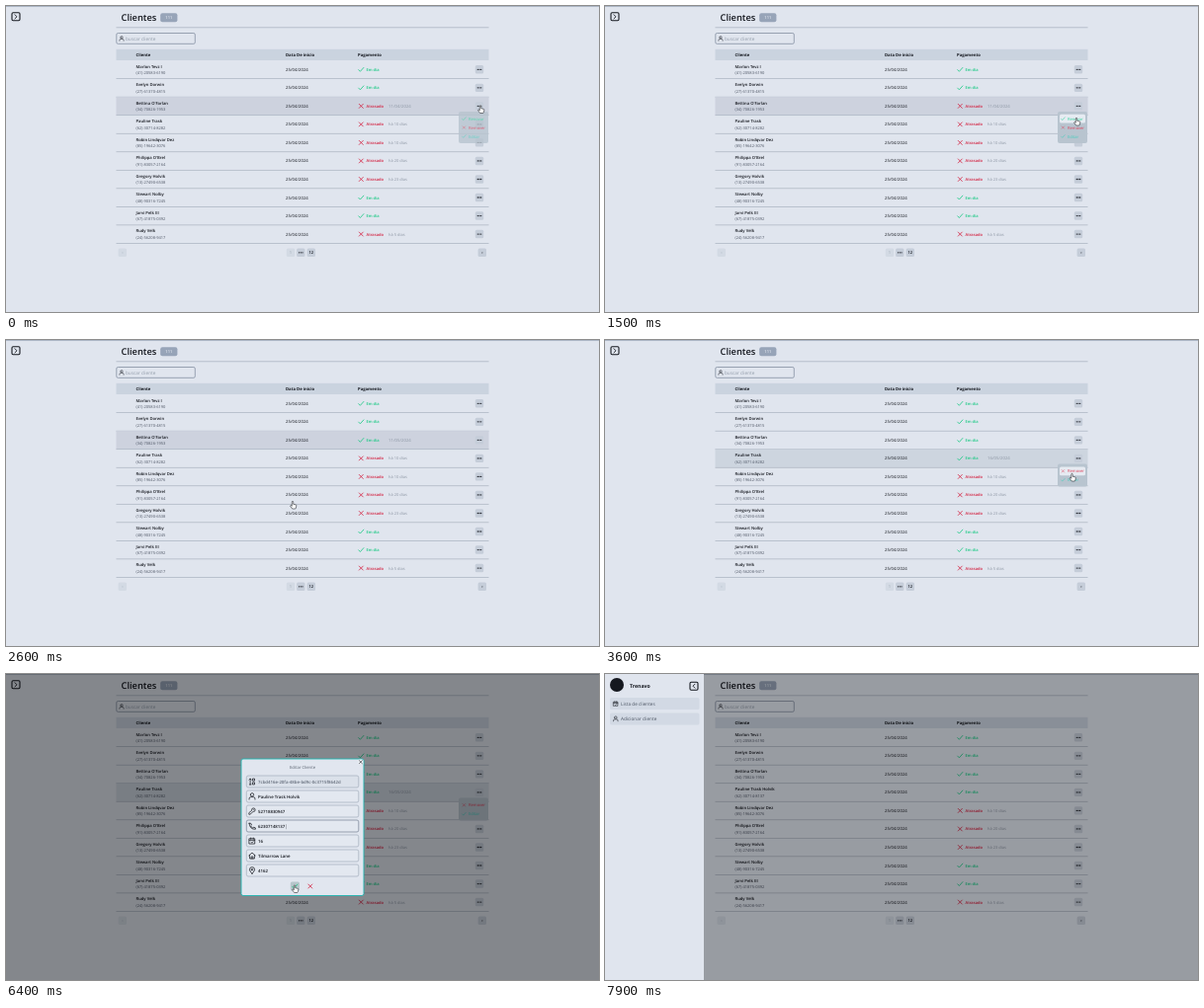
An HTML page for the animation above (8 s loop, 600 by 310 pixels).

```html
<!DOCTYPE html>
<html lang="pt">
<head>
<meta charset="utf-8">
<title>Clientes</title>
<style>
html, body { margin: 0; width: 100%; height: 100%; overflow: hidden; background: #e0e5ee; }
svg { display: block; width: 600px; height: 310px; font-family: "Open Sans", "Noto Sans", sans-serif; text-rendering: geometricPrecision; }
</style>
</head>
<body>
<svg id="stage" viewBox="0 0 600 310"></svg>
<script>
const LOOP = 8000, STEP = 100;
const INK = '#15181f', GREEN = '#18c983', RED = '#d3203f', GRAY = '#8e97a5', PAGE = '#e0e5ee';
const stage = document.getElementById('stage');

// name, phone, days overdue (0 = paid)
const clients = [
  ['Marlon Tevz I', '(41) 20583-6190', 0],
  ['Evelyn Dorwin', '(27) 61370-4815', 0],
  ["Bettina O'Farlan", '(34) 70826-1953', 15],
  ['Pauline Trask', '(62) 30714-8282', 10],
  ['Robin Lindqvar Dez', '(85) 19642-3076', 10],
  ["Philippa O'Brel", '(91) 83057-2164', 20],
  ['Gregory Holvik', '(13) 27490-6538', 23],
  ['Stewart Nolby', '(48) 90316-7245', 0],
  ['Jarvi Pelk III', '(67) 41875-0392', 0],
  ['Rudy Velk', '(24) 56208-9417', 5]
];

const modal = { renewOpen: 1700, renewClose: 2600, editOpen: 4600, editClose: 6500 };
const SIDEBAR = 7600;

// time, x, y of the pointer's tip
const pointerPath = [
  [0, 480, 101], [800, 479, 103], [1400, 477, 113.5], [1700, 477, 113.5], [2300, 290, 163.5], [2600, 290, 163.5],
  [3100, 479, 119], [3600, 472.5, 135.5], [4200, 472.5, 140], [4700, 472.5, 140], [5200, 330, 127],
  [5500, 300, 154], [6100, 300, 154], [6400, 292, 214], [6600, 292, 214], [7100, 138.5, 34], [7500, 10, 10], [8000, 10, 10]
];

const clamp = v => Math.max(0, Math.min(1, v));
const ramp = (t, from, length) => clamp((t - from) / length);
const easeOut = p => 1 - (1 - p) ** 3;
const within = (t, a, b) => t >= a && t < b;

function pointerAt(t) {
  const i = pointerPath.findIndex(p => p[0] > t);
  const [t0, x0, y0] = pointerPath[i - 1], [t1, x1, y1] = pointerPath[i];
  const p = (t - t0) / (t1 - t0), e = p * p * (3 - 2 * p);
  return [x0 + (x1 - x0) * e, y0 + (y1 - y0) * e];
}

const rect = (x, y, w, h, fill, r = 0, stroke = 'none', sw = 0.6) =>
  `<rect x="${x}" y="${y}" width="${w}" height="${h}" rx="${r}" fill="${fill}" stroke="${stroke}" stroke-width="${sw}"/>`;
const text = (x, y, size, str, fill = INK, weight = 400, anchor = 'start') =>
  `<text x="${x}" y="${y}" font-size="${size}" fill="${fill}" font-weight="${weight}" text-anchor="${anchor}">${str}</text>`;
const line = (d, color, sw = 0.8) =>
  `<path d="${d}" fill="none" stroke="${color}" stroke-width="${sw}" stroke-linecap="round" stroke-linejoin="round"/>`;
const group = (content, x, y, scale = 1, opacity = 1) =>
  `<g transform="translate(${x} ${y}) scale(${scale})" opacity="${opacity}">${content}</g>`;
const check = (x, y, s = 1, c = GREEN) => group(line('M-2.5 .3L-.9 2L2.6 -1.9', c), x, y, s);
const cross = (x, y, s = 1, c = RED) => group(line('M-2 -2L2 2M2 -2L-2 2', c), x, y, s);
const dots = (x, y) => [-1.7, 0, 1.7].map(d => `<circle cx="${x + d}" cy="${y}" r=".65" fill="${INK}"/>`).join('');
const tile = (x, y, content, fill = '#c5cdd9') => rect(x - 4.2, y - 4.2, 8.4, 8.4, fill, 1.5) + content;

const person = 'M-1.6 -1.6a1.6 1.6 0 1 0 3.2 0a1.6 1.6 0 1 0 -3.2 0M-2.8 3v-.8q0-1.6 1.6-1.6h2.4q1.6 0 1.6 1.6v.8';
const icons = {
  id: 'M-1.8 -2.8v5.6M-2.8 -1.8l1-1l1 1M-2.5 2.8h1.5M.8 -2.8h1.6v2h-1.6zM.8 .8h1.6v2h-1.6z',
  person,
  key: 'M-.4 -1a1.7 1.7 0 1 1 1.4 1.4L-2 3.1h-1v-1.2zM1.6 -1.6h.1',
  phone: 'M-2.8 -2.6h1.6l.7 1.7l-.9.8q.7 1.5 2.2 2.1l.8-.9l1.6.7v1.3q-5.6 .2-6-5.7z',
  calendar: 'M-2.6 -2.1h5.2v5h-5.2zM-2.6 -.6h5.2M-1.2 -2.9v1.3M1.2 -2.9v1.3M-1 1.2l.8.7l1.3-1.3',
  house: 'M-3.1 -.1L0 -2.8L3.1 -.1M-2.3 -.6v3.5h4.6v-3.5M-.8 2.9v-2h1.6v2',
  pin: 'M0 3.1q-2.5-2.5-2.5-3.8a2.5 2.5 0 1 1 5 0q0 1.3-2.5 3.8zM-.8 -.7a.8.8 0 1 0 1.6 0a.8.8 0 1 0-1.6 0'
};
const icon = (name, x, y, s = 1) => group(line(icons[name], INK, 0.7), x, y, s);
const toggle = (x, y, dir) => rect(x - 4, y - 4, 8, 8, 'none', 1.2, INK, 1.1) +
  line(`M${x - dir} ${y - 2}l${2 * dir} 2l${-2 * dir} 2`, INK, 0.9);

function header(t) {
  return rect(0, 0, 600, 310, PAGE) + rect(0, 0, 600, 0.7, '#9aa5b6') + toggle(10, 10.8, 1) +
    text(116.5, 15.2, 9.3, 'Clientes', INK, 600) +
    rect(156.2, 7.2, 17.2, 9, '#97a4b8', 2) + text(164.8, 13.3, 4, '111', '#dfe5ee', 600, 'middle') +
    rect(111.5, 21.5, 377, 0.7, '#a5aebc') +
    rect(111.8, 27.5, 79.5, 10.8, 'none', 1.5, within(t, 7000, 7200) ? '#5f6b80' : '#8490a3', 0.8) +
    icon('person', 117, 33, 0.75) + text(121, 34.8, 4.7, 'buscar cliente', '#929caa') +
    rect(111.5, 43.8, 377, 11.2, '#cad3df') +
    [[131.5, 'Cliente'], [283, 'Data De inicio'], [356, 'Pagamento']].map(([x, s]) => text(x, 50.9, 4.2, s, INK, 700)).join('');
}

function status(y, late, note) {
  return (late ? cross(359.3, y) + text(364.5, y + 1.5, 4, 'Atrasado', RED, 600)
               : check(359.3, y) + text(364.5, y + 1.5, 4, 'Em dia', GREEN, 600)) +
    (note ? text(387, y + 1.5, note.includes('/') ? 4.3 : 4, note, GRAY) : '');
}

function table(t) {
  const hovered = t < 2900 ? 2 : t < modal.editClose ? 3 : -1;
  const paidAt = { 2: modal.renewClose, 3: 2900 };
  const edited = t >= modal.editClose;
  return clients.map(([name, phone, days], i) => {
    const top = 55.1 + i * 18.53, y = top + 9.2;
    const late = days > 0 && !(t >= paidAt[i]);
    let note = late ? `há ${days} dias` : '';
    if (i === hovered) note = `${i === 2 ? 11 : 16}/${late ? '04' : '05'}/2024`;
    if (i === 3 && edited) { name += ' Holvik'; phone = '(62) 30714-8137'; }
    return (i === hovered ? rect(111.5, top, 377, 18.5, i === 2 ? '#cdd2de' : '#cdd5df') : '') +
      rect(111.5, top + 18.2, 377, 0.7, '#a9b2bf') +
      text(131.5, y - 1.7, 4.15, name, INK, 600) + text(131.5, y + 4.7, 4, phone, '#4b5362') +
      text(283, y + 1.5, 4.3, '25/04/2024', INK, 500) + status(y, late, note) +
      tile(479, y, dots(479, y));
  }).join('');
}

function pager() {
  const y = 249.8, faint = '#d3dae4';
  const label = (x, s, c = INK) => text(x, y + 1.4, 4, s, c, 600, 'middle');
  return tile(117.8, y, label(117.8, '‹', '#aab3c0'), faint) + tile(288, y, label(288, '1', '#aab3c0'), faint) +
    tile(298.3, y, dots(298.3, y)) + tile(308.8, y, label(308.8, '12')) + tile(481.8, y, label(481.8, '›'));
}

function rowMenu(t) {
  const first = t < modal.renewClose;
  if (!first && !within(t, 3200, modal.editClose)) return '';
  const top = first ? 107 : 125.6;
  const items = [['Renovar', '#30d39b'], ['Remover', '#dd4059'], ['Editar', '#45cdbd']].slice(first ? 0 : 1);
  let hover = -1;
  if (within(t, 1200, 1800)) hover = 0;
  else if (first && t >= 1800) hover = -1;
  else if (within(t, 3400, 4000)) hover = 0;
  else if (within(t, 4000, 4600)) hover = 1;
  const body = rect(458, top, 30, first ? 32 : 22.8, '#b8c4cf', 2) + items.map(([label, color], i) => {
    const y = top + 7.2 + i * 8.9;
    const mark = label === 'Remover' ? cross(463.4, y, 0.6, color) : check(463.4, y, 0.7, color);
    return (i === hover ? rect(460, y - 4.4, 26, 8.8, '#e6ebf2', 1.5) : '') + mark + text(468, y + 1.5, 4.1, label, color, 500);
  }).join('');
  return group(body, 0, 0, 1, first ? 0.8 + 0.2 * ramp(t, 0, 300) : 0.6 + 0.4 * ramp(t, 3200, 200));
}

const shade = opacity => `<rect width="600" height="310" opacity="${opacity}"/>`;
const panel = (x, y, w, h) => rect(x, y, w, h, '#e1e6ef', 2, '#1fb5b0', 0.9) +
  rect(x + w - 5.5, y + 0.8, 4.8, 4.8, '#eef1f6', 0.6) + cross(x + w - 3.1, y + 3.2, 0.75, INK);

function renewModal(t) {
  const p = ramp(t, modal.renewOpen - STEP, 200);
  return shade(0.41 * p) + group(panel(246, 142, 108, 26.2) +
    text(300, 152.2, 4.14, 'Realmente deseja renovar a mensalidade do Cliente?', '#343b48', 400, 'middle') +
    (t >= 2200 ? rect(287.8, 156.6, 9.2, 9.2, '#b6c6cb', 1.5) : '') +
    check(292.3, 161.2) + cross(307.8, 161.2), 0, 0, 1, p);
}

function typed(t) {
  const extra = ' Holvik';
  const name = clients[3][0] + extra.slice(0, Math.floor(ramp(t, 4700, 700) * extra.length));
  const erased = Math.floor(ramp(t, 5500, 300) * 3), added = Math.floor(ramp(t, 5800, 400) * 3);
  return [name, '62307148282'.slice(0, 11 - erased) + '137'.slice(0, added)];
}

function editModal(t) {
  const [name, phone] = typed(t);
  const fields = [
    ['id', '7cbd416e-20fa-48be-bd9c-0c3715f8642d'], ['person', name], ['key', '52718830947'], ['phone', phone],
    ['calendar', '16'], ['house', 'Tilmarrow Lane'], ['pin', '4162']
  ];
  const focus = t < 5500 ? 1 : 3;
  return shade(0.41) + panel(238, 86, 124, 138.5) + text(300, 96, 4.2, 'Editar Cliente', '#5b6471', 400, 'middle') +
    fields.map(([mark, value], i) => {
      const y = 109 + i * 15;
      const caret = i === focus ? `<tspan font-weight="300" font-size="5">|</tspan>` : '';
      return rect(243.3, y - 6, 113.5, 12, i ? '#e3e8f0' : '#dbe1ea', 1.8, i === focus ? '#737e91' : '#a3adbb', 0.7) +
        icon(mark, 249, y, 1.05) + text(255, y + 1.6, 4.35, value + caret, i ? INK : '#626b79', 600);
    }).join('') +
    (t >= 6300 ? rect(287.8, 210.4, 9.2, 9.2, '#b6c6cb', 1.5) : '') + check(292.3, 215) + cross(307.8, 215);
}

function sidebar(t) {
  const p = easeOut(ramp(t, SIDEBAR, 300));
  const entry = (y, mark, label) => rect(5, y, 90.5, 12, '#d2d9e4', 1.5) + icon(mark, 10.8, y + 6, 0.8) +
    text(16, y + 7.7, 4.7, label, '#4c5563');
  return shade(0.32 * ramp(t, SIDEBAR, 300)) + group(rect(0, 0, 100, 310, PAGE) +
    `<circle cx="12" cy="11" r="7" fill="${INK}"/>` + text(25, 13.8, 5.2, 'Trenavo', INK, 700) + toggle(90, 12.2, -1) +
    entry(24, 'calendar', 'Lista de clientes') + entry(39.4, 'person', 'Adicionar cliente'), -100 * (1 - p), 0);
}

function pointer(t) {
  if (t >= SIDEBAR + STEP) return '';
  const [x, y] = pointerAt(t);
  const beam = within(t, 5000, 6200) || within(t, 7000, 7200);
  if (beam) return group(line('M-1 -3h2M0 -3v6M-1 3h2', INK, 0.7), x, y);
  if (within(t, 6700, 7000)) {
    return group(`<path d="M0 0v6l1.4-1.2l1 2l1-.5l-1-1.9h1.8z" fill="#fff" stroke="${INK}" stroke-width=".5"/>`, x, y);
  }
  const hand = 'M-.7 .6q0-.8.7-.8t.7.8v2.2l2.4.5q.8.2.7 1l-.4 2.2l-.6 1h-3.1l-1.9-2.5q-.4-.8.3-1t1.2.8z';
  return group(`<path d="${hand}" fill="#fff" stroke="${INK}" stroke-width=".55" stroke-linejoin="round"/>`, x, y);
}

function draw(now) {
  const t = Math.floor((now % LOOP) / STEP) * STEP;
  stage.innerHTML = header(t) + table(t) + pager() + rowMenu(t) +
    (within(t, modal.renewOpen, modal.renewClose) ? renewModal(t) : '') +
    (within(t, modal.editOpen, modal.editClose) ? editModal(t) : '') +
    (t >= SIDEBAR ? sidebar(t) : '') + pointer(t);
}

function tick() {
  draw(performance.now());
  requestAnimationFrame(tick);
}
tick();
</script>
</body>
</html>
```
